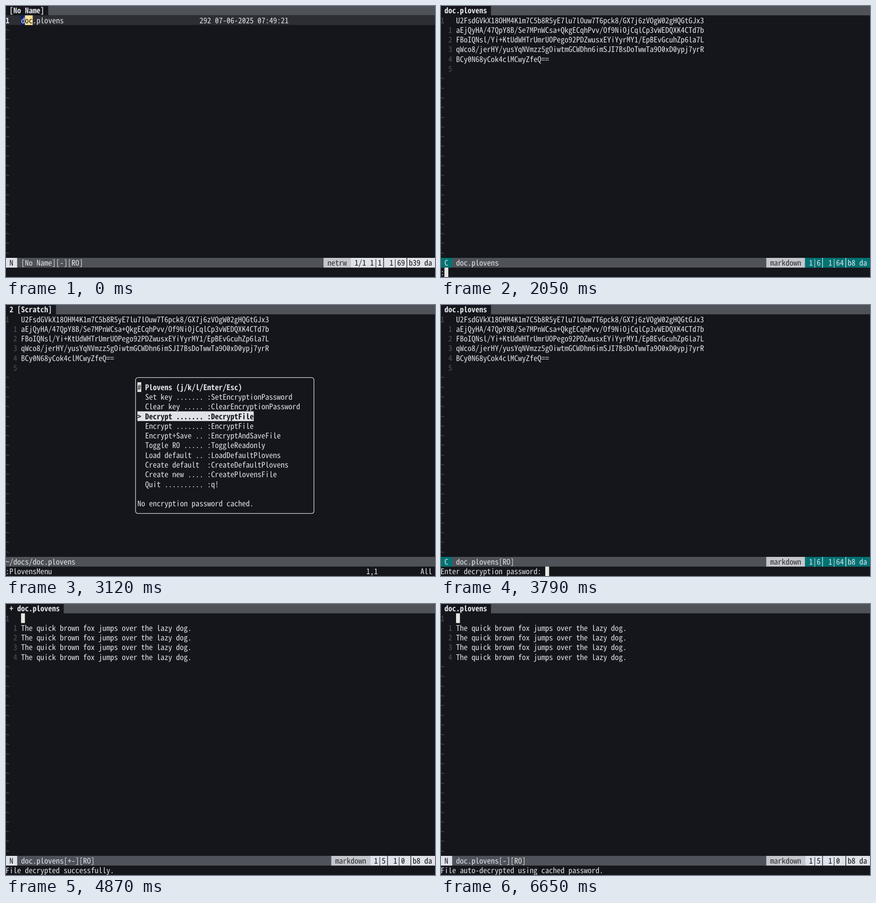
An HTML page that plays this animation: 942x595 px, repeating every 8 s.

```html
<!DOCTYPE html>
<html lang="en">
<head>
<meta charset="utf-8">
<title>Encrypted document in a terminal editor</title>
<style>
  html, body { margin: 0; width: 100%; height: 100%; overflow: hidden; background: #14161b; }
  svg { display: block; width: 942px; height: 595px; }
  text {
    white-space: pre;
    font-kerning: none;
    font-variant-ligatures: none;
    text-rendering: geometricPrecision;
  }
</style>
</head>
<body>
<svg id="screen" viewBox="0 0 942 595" xmlns="http://www.w3.org/2000/svg"></svg>
<script>
const LOOP = 8000;
const CELL = 8.515, ROW = 21.3, LEFT = -1, TOP = -0.8, BASE = 17;
const COLS = 112, STATUS_ROW = 26, CMD_ROW = 27;
const FONT = '"Noto Sans Mono CJK JP", "Noto Sans Mono CJK SC", "Noto Sans Mono CJK KR", ' +
  '"Noto Sans Mono", "DejaVu Sans Mono", monospace';

const BG = '#14161b', FG = '#e0e2ea', BAR = '#4f5258', LINE = '#2c2e33',
  TYPE = '#c4c6cd', TEAL = '#007373', CURSOR = '#e8e7e2', NAVY = '#00217a', YELLOW = '#fce094';

const NAME = 'Plovens';
const FILE = 'doc.' + NAME.toLowerCase();
const MENU_CMD = `:${NAME}Menu`;
const PROMPT = 'Enter decryption password: ';

const CIPHER = [
  'U2FsdGVkX18OHM4K1m7C5b8R5yE7lu7lOuw7T6pck8/GX7j6zVOgW02gHQGtGJx3',
  'aEjQyHA/47QpY8B/Se7MPnWCsa+QkgECqhPvv/Of9NiOjCqlCp3vWEDQXK4CTd7b',
  'FBoIQNsl/Yi+KtUdWHTrUmrUOPego92PDZwusxEYiYyrMY1/EpBEvGcuhZp6la7L',
  'qWco8/jerHY/yusYqNVmzz5gOiwtmGCWDhn6imSJI7BsDoTwwTa9O0xD0ypj7yrR',
  'BCy0N68yCok4clMCwyZfeQ==',
  ''
];
const PLAIN = ['', ...Array(4).fill('The quick brown fox jumps over the lazy dog.')];

const MENU = [
  ['Set key .......', 'SetEncryptionPassword'],
  ['Clear key .....', 'ClearEncryptionPassword'],
  ['Decrypt .......', 'DecryptFile'],
  ['Encrypt .......', 'EncryptFile'],
  ['Encrypt+Save ..', 'EncryptAndSaveFile'],
  ['Toggle RO .....', 'ToggleReadonly'],
  ['Load default ..', `LoadDefault${NAME}`],
  ['Create default ', `CreateDefault${NAME}`],
  ['Create new ....', `Create${NAME}File`],
  ['Quit ..........', 'q!']
];

// Font size at which one monospaced glyph fills one cell.
function fitSize() {
  const ctx = document.createElement('canvas').getContext('2d');
  ctx.font = `100px ${FONT}`;
  return 100 * CELL / ctx.measureText('M').width;
}

const screen = document.getElementById('screen');
screen.style.fontFamily = FONT;
screen.style.fontSize = fitSize() + 'px';

const px = col => LEFT + col * CELL;
const py = row => TOP + row * ROW;

function fill(col, row, cols, color) {
  return `<rect x="${px(col)}" y="${py(row)}" width="${cols * CELL}" height="${ROW}" fill="${color}"/>`;
}

// Slash inside a zero.
function slash(col, row, color) {
  return `<path d="M${px(col) + 2.9} ${py(row) + BASE - 3.4}l2.8 -5.6" stroke="${color}" stroke-width="1.1"/>`;
}

function text(col, row, str, color = FG, bold = false) {
  const safe = str.replace(/&/g, '&amp;').replace(/</g, '&lt;').replace(/>/g, '&gt;');
  const slashes = [...str].map((ch, i) => ch === '0' ? slash(col + i, row, color) : '').join('');
  return `<text x="${px(col)}" y="${py(row) + BASE}" fill="${color}" font-weight="${bold ? 700 : 400}">${safe}</text>` + slashes;
}

function block(col, row, str, ink = BG, paper = CURSOR) {
  return fill(col, row, str.length, paper) + text(col, row, str, ink);
}

function tabline(title) {
  const end = title.length + 2;
  return fill(end, 0, COLS - end, BAR) + text(1, 0, title, FG, true);
}

function tildes(from) {
  let out = '';
  for (let row = from; row < STATUS_ROW; row++) out += text(0, row, '~', BAR);
  return out;
}

// Text buffer with relative line numbers.
function buffer(lines, cursor) {
  const rows = lines.map((line, i) =>
    text(i ? 2 : 0, i + 1, String(i || 1), BAR) + text(4, i + 1, line)).join('');
  const mark = cursor ? block(4, 1, lines[0][0] || ' ') : '';
  return rows + mark + tildes(lines.length + 1);
}

function status(mode, title, type, typeCol, info) {
  const paper = mode === 'C' ? TEAL : FG;
  const ink = mode === 'C' ? FG : BG;
  const infoCol = typeCol + type.length + 2;
  let out = fill(0, STATUS_ROW, COLS, BAR) +
    block(0, STATUS_ROW, ` ${mode} `, ink, paper) +
    text(4, STATUS_ROW, title) +
    block(typeCol, STATUS_ROW, ` ${type} `, LINE, TYPE) +
    fill(infoCol, STATUS_ROW, COLS - infoCol, paper) +
    text(infoCol, STATUS_ROW, info.replace(/│/g, ' '), ink);
  [...info].forEach((ch, i) => {
    if (ch === '│') {
      out += `<rect x="${px(infoCol + i + 0.5) - 0.7}" y="${py(STATUS_ROW)}" width="1.4" height="${ROW}" fill="${ink}"/>`;
    }
  });
  return out;
}

function command(str, cursor) {
  return text(0, CMD_ROW, str) + (cursor ? block(str.length, CMD_ROW, ' ') : '');
}

function listing(cmd) {
  return tabline('[No Name]') +
    fill(0, 1, COLS, LINE) +
    text(0, 1, '1', FG, true) +
    block(4, 1, 'd', FG, NAVY) + block(5, 1, 'oc', BG, YELLOW) +
    text(7, 1, FILE.slice(3)) +
    text(50, 1, '292 07-06-2025 07:49:21') +
    tildes(2) +
    status('N', '[No Name][-][RO]', 'netrw', 82, ' 1/1 1|1│ 1|69│b39 da') +
    command(cmd);
}

function locked(mode, flags, cmd) {
  const typing = mode === 'C';
  return tabline(FILE) + buffer(CIPHER, !typing) +
    status(mode, FILE + flags, 'markdown', 84, ' 1|6│ 1|64│b8 da') +
    command(cmd, typing);
}

function unlocked(mode, title, flags, cmd) {
  const typing = mode === 'C';
  return tabline(title) + buffer(PLAIN, !typing) +
    status(mode, FILE + flags, 'markdown', 84, ' 1|5│ 1|0 │b8 da') +
    command(cmd, typing);
}

function menu(picked) {
  const x = px(33.5) + 0.25, y = py(7.5) + 0.5;
  const items = MENU.map(([label, cmd], i) => {
    const on = i === picked, row = 9 + i;
    const str = `${on ? '>' : ' '} ${label} :${cmd}`;
    return (on ? fill(34, row, str.length, FG) : '') + text(34, row, str, on ? BG : FG, on);
  }).join('');
  return tabline('2 [Scratch]') + buffer(CIPHER, false) +
    `<rect x="${x}" y="${y}" width="${46 * CELL}" height="${14 * ROW}" rx="5" fill="${BG}" stroke="${FG}" stroke-width="1.3"/>` +
    block(34, 8, '#') +
    text(36, 8, `${NAME} (j/k/l/Enter/Esc)`, FG, true) +
    items +
    text(34, 20, 'No encryption password cached.') +
    fill(0, STATUS_ROW, COLS, BAR) +
    text(0, STATUS_ROW, `~/docs/${FILE}`) +
    command(MENU_CMD) + text(93, CMD_ROW, '1,1') + text(107, CMD_ROW, 'All');
}

// Number of keys pressed by time t.
function keys(t, start, max) {
  return t < start ? 0 : Math.min(max, 1 + Math.floor((t - start) / 70));
}

function view(t) {
  if (t < 850) return listing('');
  if (t < 2050) return locked('N', '', '');
  if (t < 2800) {
    const n = keys(t, 2050, 5);
    return locked('C', '', n < 5 ? MENU_CMD.slice(0, n) : MENU_CMD);
  }
  if (t < 3790) return menu(t < 3060 ? 0 : t < 3120 ? 1 : 2);
  if (t < 4870) return locked('C', '[RO]', PROMPT + '*'.repeat(keys(t, 4050, 8)));
  if (t < 5670) return unlocked('N', '+ ' + FILE, '[+-][RO]', 'File decrypted successfully.');
  if (t < 5730) return unlocked('C', '+ ' + FILE, '[+-][RO]', ':bd!');
  if (t < 6650) return listing(':bd!');
  return unlocked('N', FILE, '[-][RO]', 'File auto-decrypted using cached password.');
}

const start = performance.now();
let shown = '';
function tick() {
  const next = view((performance.now() - start) % LOOP);
  if (next !== shown) {
    screen.innerHTML = `<rect width="942" height="595" fill="${BG}"/>` + next;
    shown = next;
  }
  requestAnimationFrame(tick);
}
tick();
</script>
</body>
</html>
```
